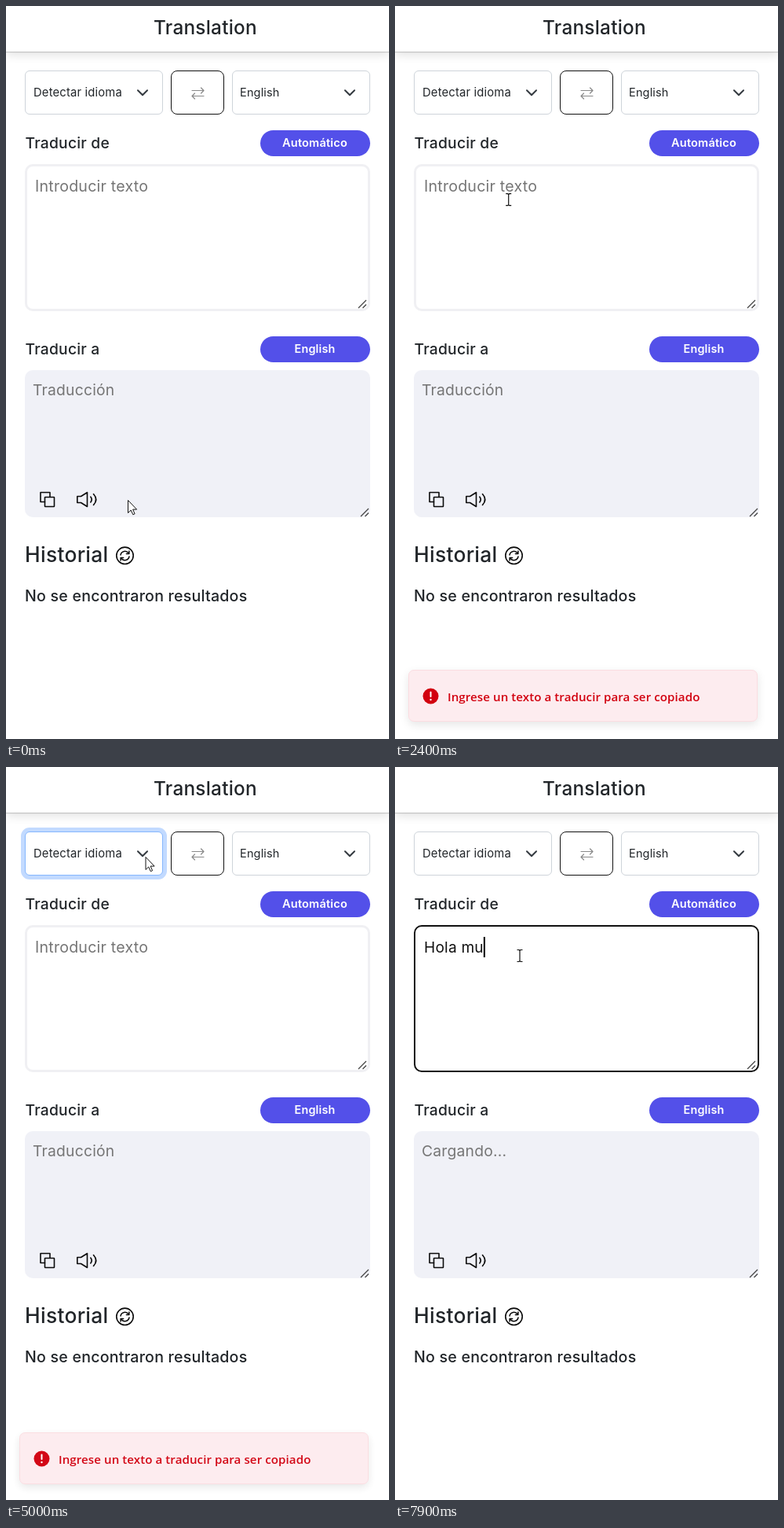
Write an HTML page that moves like this. It is 488 px wide and 932 px high and loops after 8 s.

```html
<!DOCTYPE html>
<html lang="es">
<head>
<meta charset="utf-8">
<title>Translation</title>
<style>
  html, body { margin: 0; width: 100%; height: 100%; overflow: hidden; background: #fff; }
  #stage { position: relative; width: 488px; height: 932px; overflow: hidden; background: #fff;
    font-family: Inter, "Open Sans", sans-serif; font-optical-sizing: none; }
  #stage > * { position: absolute; box-sizing: border-box; }
  svg { left: 0; top: 0; width: 488px; height: 932px; overflow: visible; }
  text { fill: #212529; white-space: pre; letter-spacing: .011em; }
  .header { left: 0; top: 0; width: 488px; height: 58px; background: #fff;
    box-shadow: 0 1px 1px rgba(0,0,0,.17), 0 4px 12px rgba(0,0,0,.12); }
  .select { top: 82px; width: 176px; height: 56px; border: 1px solid #ced4da; border-radius: 6px; background: #fff; }
  .swap { left: 210px; top: 82px; width: 68px; height: 56px; border: 1px solid #111; border-radius: 8px; }
  .pill { left: 324px; width: 140px; height: 33px; border-radius: 17px; background: #5350e9; }
  #input { left: 24px; top: 201px; width: 440px; height: 187px; border: 3px solid #f0f0f3; border-radius: 10px; }
  #input.focus { border: 2px solid #111; }
  .output { left: 24px; top: 463px; width: 440px; height: 187px; border-radius: 10px; background: #f0f1f7; }
  #hover { left: 29px; top: 606px; width: 47px; height: 40px; border: 1px solid #6f6be6; border-radius: 9px; }
  #menu { left: 24px; top: 137px; width: 176px; height: 340px; border: 2px solid #a4a4a8; border-radius: 7px;
    box-shadow: 0 32px 64px rgba(0,0,0,.22), 0 2px 12px rgba(0,0,0,.16); }
  #menu.full { border: 1px solid #8b8b8f; background: #fff; border-radius: 3px 3px 7px 7px; }
  #toast { left: 17px; top: 844px; width: 445px; height: 66px; border: 1px solid #fbdde1; border-radius: 7px;
    background: #fdecef; box-shadow: 0 4px 12px rgba(0,0,0,.1); }
  #toast svg { position: absolute; left: -18px; top: -845px; }
  #toast text { font: 600 15.1px "Open Sans", "Noto Sans", sans-serif; letter-spacing: .005em; fill: #d2000f; }
  .line { fill: none; stroke: #0b0b0b; stroke-width: 1.6; stroke-linejoin: round; stroke-linecap: round; }
  .grip { fill: none; stroke: #444; stroke-width: 1.3; }
</style>
</head>
<body>
<div id="stage">
  <div class="header"></div>
  <div class="select" id="from" style="left:24px"></div>
  <div class="swap"></div>
  <div class="select" style="left:288px"></div>
  <div class="pill" style="top:158px"></div>
  <div class="pill" style="top:420px"></div>
  <div id="input"></div>
  <div class="output"></div>
  <div id="hover"></div>

  <svg id="page">
    <g class="line" style="stroke:#343a40;stroke-width:2">
      <path d="M168 107.2l6 6 6-6M432 107.2l6 6 6-6"/>
    </g>
    <path class="line" style="stroke:#8a8a8a;stroke-width:1.2" d="M237 107.5h15m-3.5-3.5 3.5 3.5-3.5 3.5M252 114.5h-15m3.5-3.5-3.5 3.5 3.5 3.5"/>
    <path class="grip" d="M449 384l10-10M454.500 384l4.500-4.500M452 649l10-10M457.500 649l4.500-4.500"/>
    <g class="line">
      <path d="M49.500 630.500h-5.500v-12h12v5.500"/>
      <rect x="49.500" y="624.500" width="12" height="12" rx=".5"/>
      <path d="M90.800 623.500h4.700l8-5v18l-8-5h-4.700zM107.800 624q2.800 3.500 0 7M111.500 620.500q6.400 7 0 14"/>
      <circle cx="151.500" cy="698.800" r="10.700"/>
      <path style="stroke-width:1.500" d="M146 698a5.700 5.700 0 0 1 10.200-2.300m.7-2.700v3.500h-3.500M157 700a5.700 5.700 0 0 1-10.200 2.300m-.7 2.700v-3.500h3.500"/>
    </g>
    <rect id="caret" y="216" width="2" height="26" fill="#000"/>
  </svg>

  <div id="menu"></div>
  <svg id="list"><rect x="25" y="138" width="174" height="22" fill="#2491fa"/></svg>

  <div id="toast">
    <svg>
      <circle cx="45.500" cy="877.500" r="10" fill="#d2000f"/>
      <path d="M45.500 872.500v5.500" stroke="#fff" stroke-width="2" stroke-linecap="round"/>
      <circle cx="45.500" cy="882" r="1.200" fill="#fff"/>
      <text x="67" y="884">Ingrese un texto a traducir para ser copiado</text>
    </svg>
  </div>

  <svg id="cursor">
    <path id="arrow" d="M.5.500v16l3.700-3.500 2.600 5.700 2.300-1-2.500-5.600h5z" fill="#fff" stroke="#111"/>
    <path id="hand" fill="#fff" stroke="#111" stroke-width="1.100" stroke-linejoin="round"
      d="M-1.500 13.500V1.500q0-1.800 1.700-1.800t1.700 1.800v6q1.600-1.300 3.200.4 1.700-1 3 .6 2.800-.7 2.800 2v5q0 2.500-1.600 4.500v3H.5v-2.500l-5.800-7q-1.300-2 .3-2.700 1.500-.3 3.500 2.700zM1.900 7.500v4.500M5.100 8v4M8.100 8.700v3.300"/>
    <path id="beam" d="M-3.500-7.500h2.500l1 1 1-1h2.500M0-6.500v13M-3.500 7.500h2.500l1-1 1 1h2.500" fill="none" stroke="#111" stroke-width="1.200"/>
  </svg>
</div>

<script>
const $ = id => document.getElementById(id);
const LOOP = 8000, STEP = 100;

function addText(parent, str, x, y, size, weight = 400, fill = '#212529', anchor = 'start') {
  const el = document.createElementNS('http://www.w3.org/2000/svg', 'text');
  el.setAttribute('x', x);
  el.setAttribute('y', y);
  el.style.cssText = `font-size:${size}px;font-weight:${weight};fill:${fill};text-anchor:${anchor}`;
  el.textContent = str;
  parent.append(el);
  return el;
}

const page = $('page');
addText(page, 'Translation', 254, 36, 24.3, 480, '#212529', 'middle');
addText(page, 'Detectar idioma', 35, 115, 14.8);
addText(page, 'English', 298, 115, 14.5);
addText(page, 'Traducir de', 24.5, 181, 19.3, 480);
addText(page, 'Traducir a', 24.5, 443, 19.3, 480);
addText(page, 'Automático', 393.5, 179, 14.6, 600, '#fff', 'middle');
addText(page, 'English', 393.5, 441, 14.4, 600, '#fff', 'middle');
addText(page, 'Historial', 24, 707, 26.4, 480);
addText(page, 'No se encontraron resultados', 24, 757, 19.6, 480);
const hint = addText(page, 'Introducir texto', 37, 236, 19.6, 400, '#757575');
const typed = addText(page, '', 37, 236, 19.1, 400, '#111');
const result = addText(page, '', 34, 495, 19.3, 400, '#757575');
page.append($('caret'));

const languages = ['Detectar idioma', 'English', 'Español', 'Deutsch', 'Danés', 'Catalán', 'Croata', 'Holandés',
  'Francés', 'Japonés', 'Coreano', 'Noruego', 'Portugés', 'Ruso', 'Italiano', 'Chino'];
languages.forEach((name, i) => addText($('list'), name, 36, 154 + 21 * i, 14.7, 400, i ? '#212529' : '#fff'));

const clamp = v => Math.max(0, Math.min(1, v));
const smooth = v => v * v * (3 - 2 * v);
const ramp = (t, start, length) => smooth(clamp((t - start) / length));
const show = (el, on) => { el.style.display = on ? '' : 'none'; };

// time, x, y of the pointer's hot spot
const path = [[0, 155, 628], [100, 155, 628], [800, 51, 624], [1800, 51, 624], [2700, 177.5, 114],
  [5200, 177.5, 114], [5700, 159, 240], [LOOP, 159, 240]];

function pointer(t) {
  const i = path.findIndex(p => p[0] > t);
  const [t0, x0, y0] = path[i - 1], [t1, x1, y1] = path[i];
  const k = ramp(t, t0, t1 - t0);
  return [x0 + (x1 - x0) * k, y0 + (y1 - y0) * k];
}

const phrase = 'Hola mu';
const typeStart = 6600, typeGap = 200, focusAt = 5870;

function render(t) {
  const [x, y] = pointer(t);
  const onCopy = x > 29 && x < 76 && y > 606 && y < 646;
  const onInput = y > 202 && y < 388;
  $('cursor').style.transform = `translate(${x}px,${y}px)`;
  show($('hand'), onCopy);
  show($('beam'), onInput);
  show($('arrow'), !onCopy && !onInput);
  show($('hover'), onCopy);

  const shown = ramp(t, 960, 400), gone = ramp(t, 4958, 400);
  $('toast').style.opacity = shown * (1 - gone);
  $('toast').style.transform = `translateY(${66 * (1 - shown + gone)}px)`;

  const open = t >= 3200 && t < 4700, full = open && t >= 3300;
  show($('menu'), open);
  show($('list'), full);
  $('menu').classList.toggle('full', full);

  const ring = ramp(t, 3200, 150) * (1 - ramp(t, focusAt, 150));
  $('from').style.boxShadow = `0 0 0 ${5 * ring}px rgba(13,110,253,.25)`;
  $('from').style.borderColor = ring ? '#86b7fe' : '#ced4da';

  const focused = t >= focusAt;
  $('input').classList.toggle('focus', focused);
  const count = t < typeStart ? 0 : Math.min(phrase.length, Math.floor((t - typeStart) / typeGap) + 1);
  typed.textContent = phrase.slice(0, count);
  show(hint, !count);
  result.textContent = count ? 'Cargando...' : 'Traducción';
  const blinkOn = count > 0 || Math.floor((t - focusAt) / 530) % 2 === 0;
  show($('caret'), focused && blinkOn);
  $('caret').setAttribute('x', 37 + (count ? typed.getComputedTextLength() : 0));
}

const origin = performance.now();
function tick() {
  const t = (performance.now() - origin) % LOOP;
  render(Math.floor(t / STEP) * STEP);
  requestAnimationFrame(tick);
}
tick();
</script>
</body>
</html>
```
